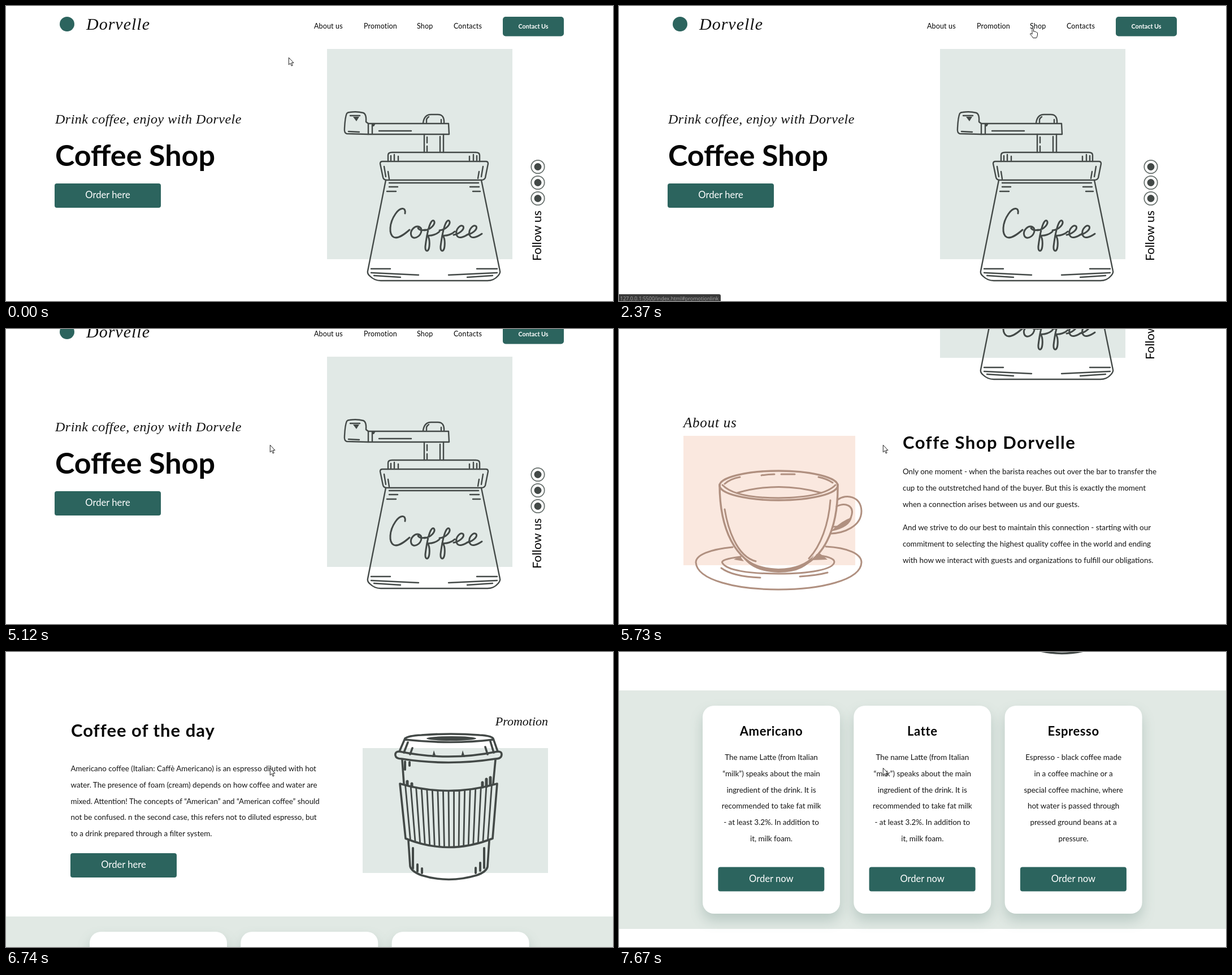
An HTML page for the animation above (8000 ms loop, 1074 by 522 pixels).

```html
<!DOCTYPE html>
<html lang="en">
<head>
<meta charset="utf-8">
<title>Coffee Shop</title>
<style>
  html, body { margin: 0; width: 100%; height: 100%; overflow: hidden; background: #fff; }
  svg { display: block; width: 1074px; height: 522px; }
  text { font-family: Lato, sans-serif; fill: #050505; white-space: pre; }
  .bold { font-weight: 700; }
  .body { font-size: 13.4px; fill: #151515; }
  .nav { font-size: 12.5px; letter-spacing: .15px; }
  .btn { font-size: 16.6px; fill: #fff; }
  .script { font-family: "Liberation Serif", serif; font-style: italic; fill: #111; }
  .mid { text-anchor: middle; }
  .end { text-anchor: end; }
  .art { fill: none; stroke-linecap: round; stroke-linejoin: round; }
  .card { fill: #fff; filter: drop-shadow(0 12px 11px rgba(44, 90, 84, .22)); }
  #status text { font: 9px "Open Sans", sans-serif; fill: #a4a4a4; }
</style>
</head>
<body>
<svg viewBox="0 0 1074 522">
  <g id="page"></g>
  <g id="status"><path fill="#3b3b3b"/><text x="2" y="520.5"></text></g>
  <g id="cursor" fill="#fff" stroke="#222" stroke-width="1" stroke-linejoin="round">
    <path id="arrow" d="M.3 .3V13L3.2 10.3 5.2 15 7.1 14.2 5.2 9.6H9Z"/>
    <path id="hand" d="M4 12V2Q5.2-.4 6.5 2V7.2Q8 6 9 7.6 10.5 6.8 11.3 8.5 13 8 13.5 9.8V13Q13 16 11.5 18.5H5.5Q4 15.5 1 12.5 0 10.5 2 10.5Z"/>
  </g>
</svg>
<script>
const LOOP = 8000, GREEN = '#2c645e', INK = '#434947', MINT = '#e1e9e6', LEAD = 28.8;
const $ = id => document.getElementById(id);

// ---- markup helpers ----
const rect = (x, y, w, h, fill, r = 0, more = '') =>
  `<rect x="${x}" y="${y}" width="${w}" height="${h}" rx="${r}" fill="${fill}" ${more}/>`;
const text = (x, y, str, cls, more = '') =>
  `<text x="${x}" y="${y}" class="${cls}" ${more}>${str}</text>`;
const font = (size, gap = 0) => `font-size="${size}" letter-spacing="${gap}"`;
const lines = (x, y, rows, cls) => rows.map((s, i) => text(x, y + i * LEAD, s, cls)).join('');
const line = (d, w) => `<path d="${d}" ${w ? `stroke-width="${w}"` : ''}/>`;
const solid = (d, fill) => `<path d="${d}" fill="${fill}" stroke="none"/>`;
const art = (dy, color, w, inner) =>
  `<g class="art" transform="translate(0 ${dy})" stroke="${color}" stroke-width="${w}">${inner}</g>`;
const button = (x, y, label) => rect(x, y, 188, 43, GREEN, 4) + text(x + 94, y + 26, label, 'btn mid');

// ---- illustrations ----
function mill() {
  const f = x => `M${x} 397c12-1 21-12 17-17-6-4-12 20-15 45-1 11 6 11 7 0 1-10-1-16-3-19 7 1 16-2 21-7`;
  const e = x => `M${x} 405c8-1 20-9 17-15-4-5-14 5-12 14 2 9 12 6 22-1`;
  return art(0, INK, 2.4,
    // crank
    line('M608 188Q621 186 632 189 638 191 637 205L641 208V227L603 226Q598 225 599 216 600 196 603 190 605 188 608 188Z') +
    line('M609 194H626M606 222L625 223') + solid('M614 196H625L620 204Z', INK) +
    line('M641 208H783L784 227H641M648 208V227M660 221H717') + solid('M648 208H654L651 213H648Z', INK) +
    line('M738 207Q740 192 752 192H764Q776 192 775 207M744 206V201Q745 198 748 196M770 206V201') +
    line('M740 227V259M774 227V259M745 232V242M745 248V257M768 231V257') +
    // collar and lid
    line('M676 275V264Q676 259 683 259H831Q838 259 838 264V275M681 273V265M687 273V263M694 273V266M820 273V266M827 273V263M833 273V265') +
    line('M666 275H849Q853 275 853 279L848 304Q846 308 841 308H674Q668 308 667 303L662 279Q662 275 666 275Z') +
    line('M669 284L672 302M676 293L678 306M844 284L841 302M837 293L835 305') +
    // jar
    line('M672 308L640 469Q639 474 644 478 652 486 663 486H852Q863 486 870 478 875 473 874 469L841 308') +
    line('M678 313H836M678 320H693M674 328H690M821 320H837M826 328H839') +
    line('M646 465H680M646 472L730 476M651 477L698 480M833 465H869M783 476L869 472M816 480L861 477') +
    line('M706 367C708 355 697 356 689 368 678 384 677 404 686 409 694 413 706 403 714 396' +
      'M732 391C724 387 714 397 717 406 720 415 735 408 735 397 735 391 730 390 729 393 732 398 738 397 742 396', 3) +
    line(f(740) + f(767) + e(792) + e(815), 3));
}

function cup() {
  const tan = '#b09080';
  return art(397, tan, 3.4,
    `<ellipse cx="282.5" cy="277" rx="104.5" ry="26"/>` +
    line('M183 276Q205 299 282 299 362 298 383 276M209 290Q282 269 358 290', 3) +
    line('M252 259Q263 257 275 257M287 257H311M187 274Q197 265 214 262M378 272Q368 265 353 262', 3) +
    line('M178 275C178 340 198 425 282 428 370 427 388 340 387 275') +
    line('M187 319C192 350 207 402 242 411M374 303C371 345 357 384 336 406', 3) +
    solid('M218 402Q242 423 282 424 325 423 345 400 332 431 282 431 235 430 218 402Z', tan) +
    solid('M341 409L354 396 369 408ZM203 408L214 402 221 411Z', tan) +
    line('M387 302C402 291 428 296 429 322 429 350 397 361 375 362M385 314C401 306 415 313 412 328 409 344 392 350 380 350', 3) +
    solid('M377 356Q393 340 412 333 409 351 376 358Z', tan) +
    line('M201 386C160 390 136 400 136 413 138 445 210 461 282 461 355 461 428 445 429 413 429 398 405 387 366 385', 3) +
    line('M215 403C190 406 180 410 183 414 190 427 230 433 282 433 335 433 380 426 381 412 381 405 365 402 350 400', 3) +
    line('M181 423Q201 438 250 440M320 438Q350 436 369 431', 3));
}

function paperCup() {
  let ribs = '';
  for (let i = 1; i < 18; i++) {
    const u = i / 18, bow = 2 * u * (1 - u);
    ribs += `M${697 + 172 * u} ${93 + 25 * bow}L${707 + 154 * u} ${190 + 31 * bow}`;
  }
  return art(1013, INK, 3.6,
    line('M696 36L706 13Q712 8 735 7 788 3 838 7 858 8 862 13L870 36M706 15Q788 24 862 15') +
    `<ellipse cx="788" cy="13" rx="44" ry="4" fill="${INK}" stroke="none"/>` +
    line('M711 20L704 38M719 30L715 41M857 18L863 38M848 28L852 41') +
    solid('M754 46L757 34 761 46ZM805 46L808 34 812 46Z', INK) +
    line('M696 36Q688 36 689 43 690 49 700 49 783 62 866 49 877 49 877 41 877 36 870 36 783 54 696 36Z') +
    line('M701 51L704 93M866 51L862 93') +
    line('M706 54V68M714 55V61', 4) +
    line('M710 95V89M718 98V93M857 95V82M850 98V85M843 99V91', 5) +
    line('M697 93Q783 118 869 93L861 190Q783 221 707 190Z') + line(ribs, 2.8) +
    line('M712 194L715 239Q717 248 735 255 783 270 833 255 850 249 852 240L855 194') +
    line('M720 207V243M728 236V248M736 243V251M846 207V242M839 233V247M831 242V251', 4));
}

// ---- page ----
const links = [
  { id: 'about', label: 'About us', x: 545, on: 780, off: 1350 },
  { id: 'promotion', label: 'Promotion', x: 633, on: 1480, off: 2080 },
  { id: 'shop', label: 'Shop', x: 727, on: 2360, off: 2520 },
  { id: 'contacts', label: 'Contacts', x: 792, on: 2700, off: 2960 },
  { id: 'contactUs', on: 3090, off: 3700 }
];

function header() {
  const ring = y => `<circle cx="941" cy="${y}" r="11.7" fill="none" stroke="#68706d" stroke-width="1.8"/>` +
    `<circle cx="941" cy="${y}" r="6.5" fill="${INK}"/>`;
  return `<circle cx="108" cy="32" r="13" fill="${GREEN}"/>` +
    text(142, 42, 'Dorvelle', 'script', font(30, 1)) +
    links.filter(l => l.label).map(l => text(l.x, 39.5, l.label, 'nav', `id="${l.id}"`)).join('') +
    rect(879, 19, 108, 34.5, GREEN, 5, 'id="contactUs"') +
    text(933, 39.5, 'Contact Us', 'bold mid', font(10.8) + ' style="fill:#fff"') +
    rect(568, 76, 328, 372, MINT) + mill() +
    text(87, 208, 'Drink coffee, enjoy with Dorvele', 'script', font(24, .5)) +
    text(87, 282.5, 'Coffee Shop', 'bold', font(52)) + button(86, 314, 'Order here') +
    [284.5, 312.5, 340.5].map(ring).join('') +
    text(0, 0, 'Follow us', '', font(21.6) + ' transform="translate(946.5 451) rotate(-90)"');
}

function about() {
  return text(114, 571, 'About us', 'script', font(25, .8)) +
    rect(114, 586, 304, 229, '#fae8df') + cup() +
    text(502, 609, 'Coffe Shop Dorvelle', 'bold', font(31, 1.5)) +
    lines(502, 654, [
      'Only one moment - when the barista reaches out over the bar to transfer the',
      'cup to the outstretched hand of the buyer. But this is exactly the moment',
      'when a connection arises between us and our guests.'], 'body') +
    lines(502, 753, [
      'And we strive to do our best to maintain this connection - starting with our',
      'commitment to selecting the highest quality coffee in the world and ending',
      'with how we interact with guests and organizations to fulfill our obligations.'], 'body');
}

function promotion() {
  return text(115, 1023, 'Coffee of the day', 'bold', font(31, 1)) +
    lines(114.5, 1084, [
      'Americano coffee (Italian: Caffè Americano) is an espresso diluted with hot',
      'water. The presence of foam (cream) depends on how coffee and water are',
      'mixed. Attention! The concepts of “American” and “American coffee” should',
      'not be confused. n the second case, this refers not to diluted espresso, but',
      'to a drink prepared through a filter system.'], 'body') +
    button(114, 1229, 'Order here') +
    text(959, 1003, 'Promotion', 'script end', font(22)) +
    rect(631, 1043, 328, 221, MINT) + paperCup();
}

function cards() {
  const milk = ['The name Latte (from Italian', '“milk”) speaks about the main',
    'ingredient of the drink. It is', 'recommended to take fat milk',
    '- at least 3.2%. In addition to', 'it, milk foam.'];
  const black = ['Espresso - black coffee made', 'in a coffee machine or a',
    'special coffee machine, where', 'hot water is passed through',
    'pressed ground beans at a', 'pressure.'];
  const card = (title, rows, i) => {
    const x = 148 + 267.3 * i, mid = x + 121.5;
    return rect(x, 1368, 243, 368, '#fff', 20, 'class="card"') +
      text(mid, 1421, title, 'bold mid', font(22, .6)) +
      lines(mid, 1464, rows, 'body mid') + button(x + 27.3, 1653.5, 'Order now');
  };
  return rect(0, 1341, 1074, 422, '#e1e9e4') +
    card('Americano', milk, 0) + card('Latte', milk, 1) + card('Espresso', black, 2);
}

$('page').innerHTML = header() + about() + promotion() + cards();

// ---- motion ----
// start, end and number of picture changes in each burst
const bursts = [[500, 1260, 12], [1330, 2100, 12], [2170, 2960, 13], [3020, 3290, 5], [3490, 3490, 1],
  [3690, 4440, 12], [4510, 4640, 3], [5120, 5730, 10], [6050, 6740, 11], [7120, 7670, 9]];
const scrollKeys = [[5119, 0], [5120, 27], [5660, 385], [5730, 397], [6049, 397], [6050, 425], [6395, 699],
  [6700, 868], [6740, 873], [7119, 873], [7120, 898], [7257, 1013], [7600, 1262], [7670, 1273]];
const cursorKeys = [[450, 500, 91], [780, 545, 52], [1000, 560, 40], [1260, 584, 39], [1350, 596, 39],
  [1480, 631, 39], [1800, 655, 38], [2080, 690, 39], [2360, 726, 38], [2520, 757, 38], [2700, 789, 39],
  [2960, 829, 42], [3090, 878, 44], [3290, 931, 49], [3489, 931, 49], [3490, 932, 49], [3650, 932, 49],
  [3800, 880, 62], [4440, 506, 180], [4640, 467, 205]];
const statusKeys = [[850, 1420, 'about'], [1550, 2450, 'promotion'], [2450, 2830, 'shop'], [2830, 3900, 'contact']];

function snap(t) {
  let held = 0;
  for (const [start, end, count] of bursts) {
    if (t < start) break;
    if (t >= end) { held = end; continue; }
    const step = (end - start) / (count - 1);
    held = start + Math.floor((t - start) / step + .12) * step;
  }
  return held;
}

function at(keys, t, col = 1) {
  if (t <= keys[0][0]) return keys[0][col];
  for (let i = 1; i < keys.length; i++) {
    const a = keys[i - 1], b = keys[i];
    if (t <= b[0]) return a[col] + (b[col] - a[col]) * (t - a[0]) / (b[0] - a[0]);
  }
  return keys[keys.length - 1][col];
}

const clamp = v => Math.max(0, Math.min(1, v));
const hex = h => [1, 3, 5].map(i => parseInt(h.slice(i, i + 2), 16));
function mix(from, to, k) {
  const a = hex(from), b = hex(to);
  return `rgb(${a.map((v, i) => Math.round(v + (b[i] - v) * k))})`;
}

const bar = document.querySelector('#status path'), barText = document.querySelector('#status text');

function draw(now) {
  const t = snap(now);
  $('page').setAttribute('transform', `translate(0 ${-Math.round(at(scrollKeys, t))})`);

  for (const l of links) {
    const k = clamp((t - l.on) / 250) - clamp((t - l.off) / 250);
    $(l.id).style.fill = l.label ? mix('#050505', GREEN, Math.max(0, k)) : mix(GREEN, '#3a7a73', Math.max(0, k));
  }

  const status = statusKeys.find(([a, b]) => t >= a && t < b);
  $('status').style.display = status ? '' : 'none';
  if (status) {
    barText.textContent = `127.0.0.1:5500/index.html#${status[2]}link`;
    const w = Math.round(barText.getComputedTextLength() + 6);
    bar.setAttribute('d', `M0 510H${w - 3}Q${w} 510 ${w} 513V522H0Z`);
  }

  const hand = links.some(l => t >= l.on && t < l.off);
  $('hand').style.display = hand ? '' : 'none';
  $('arrow').style.display = hand ? 'none' : '';
  $('cursor').setAttribute('transform',
    `translate(${Math.round(at(cursorKeys, t))} ${Math.round(at(cursorKeys, t, 2))})`);
}

const began = performance.now();
function tick() {
  draw((performance.now() - began) % LOOP);
  requestAnimationFrame(tick);
}
tick();
</script>
</body>
</html>
```
